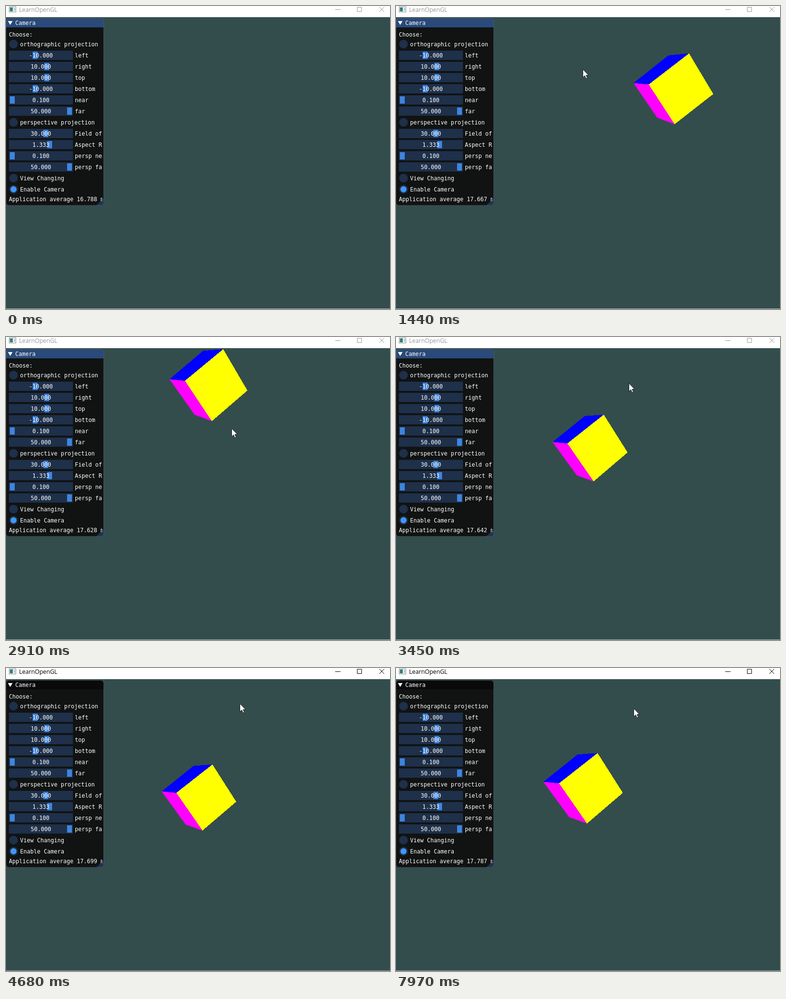
Write an HTML page that moves like this. It is 792x624 px and loops after 8000 ms.

```html
<!DOCTYPE html>
<html lang="en">
<head>
<meta charset="utf-8">
<title>Camera</title>
<style>
  html, body { margin: 0; width: 100%; height: 100%; overflow: hidden; background: #334d4d; }
  svg { display: block; }
  text { white-space: pre; }
  #panel text { font: 11.63px "DejaVu Sans Mono", monospace; fill: #fff; }
  #caption { font: 12.2px "Open Sans", "Noto Sans", sans-serif; }
</style>
</head>
<body>
<svg width="792" height="624" viewBox="0 0 792 624">
  <defs>
    <clipPath id="inner"><rect x="0" y="25" width="198.5" height="386"/></clipPath>
    <clipPath id="rounded"><rect x="0" y="25.5" width="201.5" height="385.5" rx="6"/></clipPath>
  </defs>
  <rect width="792" height="624" fill="#334d4d"/>
  <g id="cube" shape-rendering="crispEdges"></g>
  <rect id="edge" y="623" width="792" height="1"/>
  <g id="panel">
    <g clip-path="url(#rounded)">
      <rect y="25" width="202" height="387" fill="#111313"/>
      <rect id="heading" y="25" width="202" height="19"/>
      <path d="M201 396V411H186Z" fill="#1e3453"/>
    </g>
    <rect x="0" y="25.5" width="201.5" height="385" rx="6" fill="none" stroke="#6e6e80" stroke-opacity=".5"/>
    <path d="M4 31H13.5L8.7 39Z" fill="#fff"/>
    <text x="19" y="39">Camera</text>
    <text x="6" y="63">Choose:</text>
    <g id="rows" clip-path="url(#inner)"></g>
  </g>
  <rect width="792" height="23" fill="#fff"/>
  <rect x="6.5" y="1.5" width="14" height="11" fill="#f4f4f4" stroke="#8b9797"/>
  <rect x="8" y="3" width="6" height="8" fill="#2c8078"/>
  <rect x="16" y="4" width="3" height="6" fill="#bcc8d0"/>
  <text id="caption" x="27" y="12">LearnOpenGL</text>
  <path id="buttons" d="M679 7.5H690M724.5 2.5H733.5V11.5H724.5ZM770 2L780 12M780 2L770 12" fill="none"/>
  <path id="cursor" d="M.5 .5V17L4.4 13.4L7 19.4L9.6 18.3L7 12.4H12Z" fill="#fff" stroke="#111" stroke-width=".9"/>
</svg>
<script>
const LOOP = 8000, FOCAL = 725, CX = 396, CY = 324, FOCUS_TIME = 4600;
const $ = id => document.getElementById(id);

function add(parent, tag, attrs, text) {
  const el = document.createElementNS('http://www.w3.org/2000/svg', tag);
  for (const key in attrs) el.setAttribute(key, attrs[key]);
  if (text) el.textContent = text;
  return parent.appendChild(el);
}

// Sliders are [label, value, grab x], radios are [label, checked].
const ROWS = [
  ['orthographic projection', false],
  ['left', '-10.000', 55], ['right', '10.000', 79], ['top', '10.000', 79],
  ['bottom', '-10.000', 55], ['near', '0.100', 8], ['far', '50.000', 126],
  ['perspective projection', false],
  ['Field of View', '30.000', 77], ['Aspect Ratio', '1.333', 85],
  ['persp near', '0.100', 8], ['persp far', '50.000', 126],
  ['View Changing', false], ['Enable Camera', true]
];
const rows = $('rows');
ROWS.forEach(([label, value, grab], i) => {
  const y = 69 + i * 23, base = y + 14;
  if (grab) {
    add(rows, 'rect', { x: 6, y, width: 132, height: 19, fill: '#1e304a' });
    add(rows, 'rect', { x: grab, y: y + 2, width: 10, height: 15, fill: '#3d85e0' });
    add(rows, 'text', { x: 72, y: base, 'text-anchor': 'middle' }, value);
    add(rows, 'text', { x: 142, y: base }, label);
  } else {
    add(rows, 'circle', { cx: 15.5, cy: y + 9.5, r: 9, fill: '#1e304a' });
    if (value) add(rows, 'circle', { cx: 15.5, cy: y + 9.5, r: 6.2, fill: '#4296fa' });
    add(rows, 'text', { x: 29, y: base }, label);
  }
});
const stats = add(rows, 'text', { x: 6, y: 402 });

// Cube corners on screen for a camera pitched down by HOME_PITCH.
const CORNERS = [[380, 112], [420, 109], [469.5, 189], [399, 249.5], [344, 170], [313, 167], [364, 237]];
const FACES = [['#00f', 5, 0, 1, 4], ['#f0f', 5, 4, 3, 6], ['#ff0', 4, 1, 2, 3]];
const HOME_PITCH = -Math.atan(144 / FOCAL);
const faces = FACES.map(([fill]) => add($('cube'), 'polygon', { fill }));

const rays = CORNERS.map(([sx, sy]) => {
  const x = sx - CX, y = CY - sy, c = Math.cos(HOME_PITCH), s = Math.sin(HOME_PITCH);
  return [x, y * c + FOCAL * s, FOCAL * c - y * s];
});

// Camera angles that bring the cube's top corner to a screen point.
function aim(sx, sy) {
  const [X, Y, Z] = rays[1], u = sx - CX, v = CY - sy;
  const sinElevation = Y / Math.hypot(X, Y, Z);
  const pitch = Math.asin(sinElevation * Math.hypot(u, v, FOCAL) / Math.hypot(v, FOCAL)) - Math.atan2(v, FOCAL);
  const yaw = Math.atan2(X, Z) - Math.atan2(u, FOCAL * Math.cos(pitch) - v * Math.sin(pitch));
  return { yaw, pitch };
}

function project([X, Y, Z], { yaw, pitch }, zoom) {
  const x = X * Math.cos(yaw) - Z * Math.sin(yaw), z = X * Math.sin(yaw) + Z * Math.cos(yaw);
  const y = Y * Math.cos(pitch) - z * Math.sin(pitch);
  const k = zoom * FOCAL / (z * Math.cos(pitch) + Y * Math.sin(pitch));
  return [CX + x * k, CY - y * k];
}

// time, cursor x, cursor y, corner x, corner y
const MOVES = [
  [70, 649, 585, 150, -520],
  [380, 560, 330, 270, -190],
  [640, 497, 165, 395, 55],
  [900, 483, 130, 420, 109],
  [1120, 470, 131, 446, 111],
  [1673, 323, 130, 719, 88],
  [1982, 453, 132, 481, 115],
  [2200, 455, 150, 474, 85],
  [2565, 475, 398, 440, -280],
  [2909, 465, 188, 448, 25],
  [3370, 478, 100, 430, 152],
  [3908, 491, 66, 420, 205],
  [4213, 350, 72, 672, 196],
  [4600, 478, 74, 432, 198],
  [5140, 507, 70, 388, 203],
  [5600, 490, 83, 414.5, 184]
];
const AVERAGES = [
  [0, 16.788], [900, 17.496], [1670, 17.74], [1982, 17.917], [2200, 18.064], [2500, 17.82],
  [2909, 17.628], [3908, 17.653], [4900, 17.712], [5931, 17.643], [6600, 18.021],
  [7100, 18.046], [7500, 17.902], [7970, 17.787]
];
const ZOOM = [[7250, 1], [7970, 1.063]];

function valuesAt(table, t) {
  const next = table.findIndex(row => row[0] > t);
  if (next === 0) return table[0].slice(1);
  if (next < 0) return table[table.length - 1].slice(1);
  const a = table[next - 1], b = table[next], k = (t - a[0]) / (b[0] - a[0]);
  return a.slice(1).map((v, i) => v + (b[i + 1] - v) * k);
}

// Time advances in eleven even steps per stretch.
const STRETCHES = [70, 900, 1750, 2600, 3450, 4290, 5140, 6010, 6880, 7740, 8584];
function hold(time) {
  const t = time + 4;
  if (t < STRETCHES[0]) return 0;
  const i = STRETCHES.findIndex(s => s > t), start = STRETCHES[i - 1];
  const step = (STRETCHES[i] - start) / 11;
  return start + Math.floor((t - start) / step) * step;
}

function draw(now) {
  const t = hold(now % LOOP);
  const [mx, my, bx, by] = valuesAt(MOVES, t), [zoom] = valuesAt(ZOOM, t), [average] = valuesAt(AVERAGES, t);
  const camera = aim(bx, by), points = rays.map(ray => project(ray, camera, zoom));
  FACES.forEach(([, ...ids], i) => faces[i].setAttribute('points', ids.map(id => points[id]).join(' ')));

  $('cursor').setAttribute('transform', `translate(${Math.round(mx)} ${Math.round(my)})`);
  $('cursor').style.visibility = $('cube').style.visibility = t < 70 ? 'hidden' : 'visible';
  stats.textContent = `Application average ${average.toFixed(3)} ms/frame`;

  const active = t >= FOCUS_TIME;
  $('heading').setAttribute('fill', active ? '#0a0a0a' : '#294a7a');
  $('caption').setAttribute('fill', active ? '#000' : '#999');
  $('buttons').setAttribute('stroke', active ? '#000' : '#999');
  $('edge').setAttribute('fill', active ? '#a4b0b0' : '#b4bebe');
}

const began = performance.now();
function tick() {
  draw(performance.now() - began);
  requestAnimationFrame(tick);
}
tick();
</script>
</body>
</html>
```
